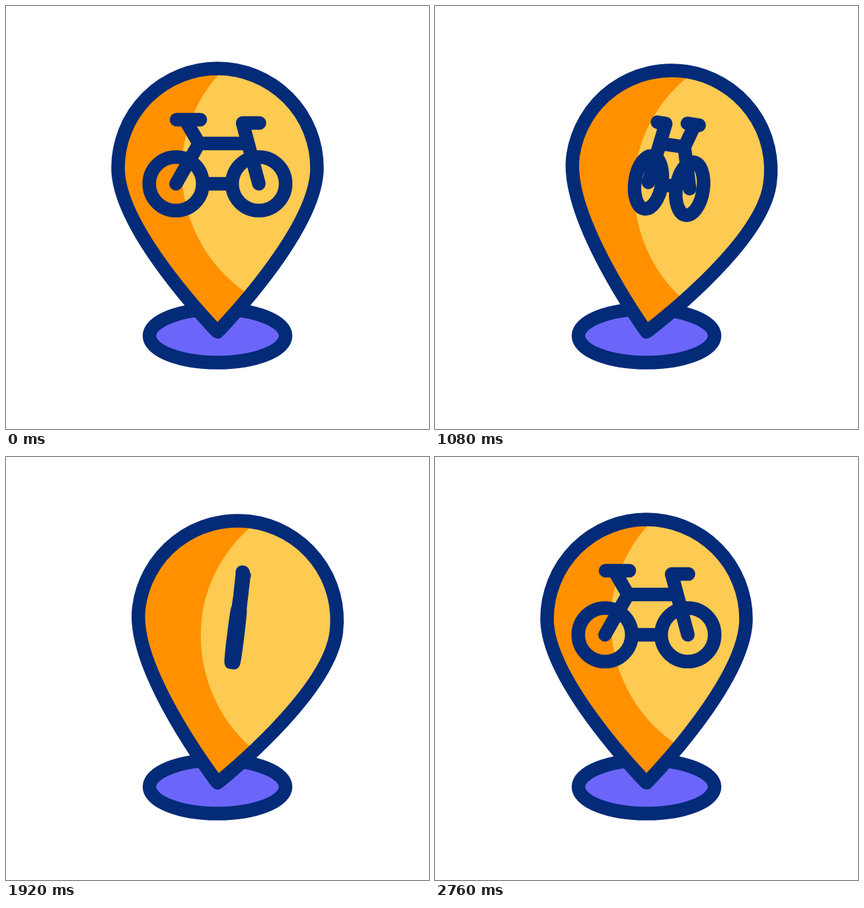
These frames come from a looping animation (640 by 640 pixels, 3000 ms). An HTML page with a canvas:

```html
<!DOCTYPE html>
<html lang="en">
<head>
<meta charset="utf-8">
<title>Bike pin</title>
<style>
  html, body { margin: 0; height: 100%; overflow: hidden; background: #fff; }
  canvas { display: block; }
</style>
</head>
<body>
<canvas id="stage" width="640" height="640"></canvas>
<script>
const ctx = document.getElementById('stage').getContext('2d');
const LOOP = 3000, STEP = 40, CENTER = 320, TIP = 493;
const NAVY = '#032b78', ORANGE = '#ff9100', YELLOW = '#fdca52', PURPLE = '#6b66f9';

// Smooth curve through [time, value] keys, flat at every extreme.
function track(keys) {
  const rate = keys.slice(1).map(([t, v], i) => (v - keys[i][1]) / (t - keys[i][0]));
  const slope = keys.map((_, i) => {
    const a = rate[i - 1] || 0, b = rate[i] || 0;
    return a * b > 0 ? 2 * a * b / (a + b) : 0;
  });
  return time => {
    if (time <= keys[0][0]) return keys[0][1];
    const i = keys.findIndex(key => time < key[0]) - 1;
    if (i < 0) return keys[keys.length - 1][1];
    const [t0, v0] = keys[i], [t1, v1] = keys[i + 1];
    const d = t1 - t0, u = (time - t0) / d, w = 1 - u;
    return v0 * w * w * (1 + 2 * u) + v1 * u * u * (3 - 2 * u)
      + d * u * w * (slope[i] * w - slope[i + 1] * u);
  };
}

const jump = track([[90, 0], [380, 41.5], [685, 0]]);
const swing = track([[276, 0], [632, -5.55], [1010, 10.2], [1455, -11.6],
  [1815, 10.45], [2170, -5.8], [2555, 0.95], [2770, 0]]);
const turn = track([[270, 1], [520, 0.755], [800, 0.036], [1320, -0.895],
  [1400, -1], [1640, -0.555], [2160, 0.45], [2720, 1]]);

const pin = new Path2D(`M320 493C320 493 169.5 340 169.5 245
  A150.5 150.5 0 0 1 470.5 245C470.5 340 320 493 320 493Z`);
const shade = new Path2D(`M330 95C290 135 266 190 266 247
  C266 330 310 400 369 437L320 520L140 400V80Z`);

function line(...points) {
  ctx.moveTo(points[0], points[1]);
  for (let i = 2; i < points.length; i += 2) ctx.lineTo(points[i], points[i + 1]);
}

function wheel(x) {
  ctx.moveTo(x + 40.5, 269);
  ctx.arc(x, 269, 40.5, 0, 2 * Math.PI);
}

function drawShadow(height) {
  ctx.beginPath();
  ctx.ellipse(CENTER, 499, 103 - height * 0.565, 40.5, 0, 0, 2 * Math.PI);
  ctx.fillStyle = PURPLE;
  ctx.fill();
  ctx.stroke();
}

function drawPin() {
  ctx.fillStyle = YELLOW;
  ctx.fill(pin);
  ctx.save();
  ctx.clip(pin);
  ctx.fillStyle = ORANGE;
  ctx.fill(shade);
  ctx.restore();
  ctx.stroke(pin);
}

// Only the path is squeezed; the stroke keeps its width.
function drawBike(side) {
  ctx.save();
  ctx.translate(CENTER, 0);
  ctx.scale(side, 1);
  ctx.translate(-CENTER, 0);
  ctx.beginPath();
  wheel(257.2);
  wheel(382.6);
  line(297.7, 269, 342.1, 269);
  line(258, 172, 294, 172);
  line(271, 172, 292, 208, 257.2, 269);
  line(292, 208, 366, 208);
  line(383.5, 177, 358, 177, 382.6, 269);
  ctx.restore();
  ctx.stroke();
}

function draw() {
  const time = Math.floor(performance.now() % LOOP / STEP) * STEP;
  const height = jump(time);
  ctx.clearRect(0, 0, 640, 640);
  ctx.strokeStyle = NAVY;
  ctx.lineWidth = 20.5;
  ctx.lineCap = ctx.lineJoin = 'round';
  drawShadow(height);
  ctx.save();
  ctx.translate(CENTER, TIP - height);
  ctx.rotate(swing(time) * Math.PI / 180);
  ctx.translate(-CENTER, -TIP);
  drawPin();
  drawBike(turn(time));
  ctx.restore();
  requestAnimationFrame(draw);
}
draw();
</script>
</body>
</html>
```
